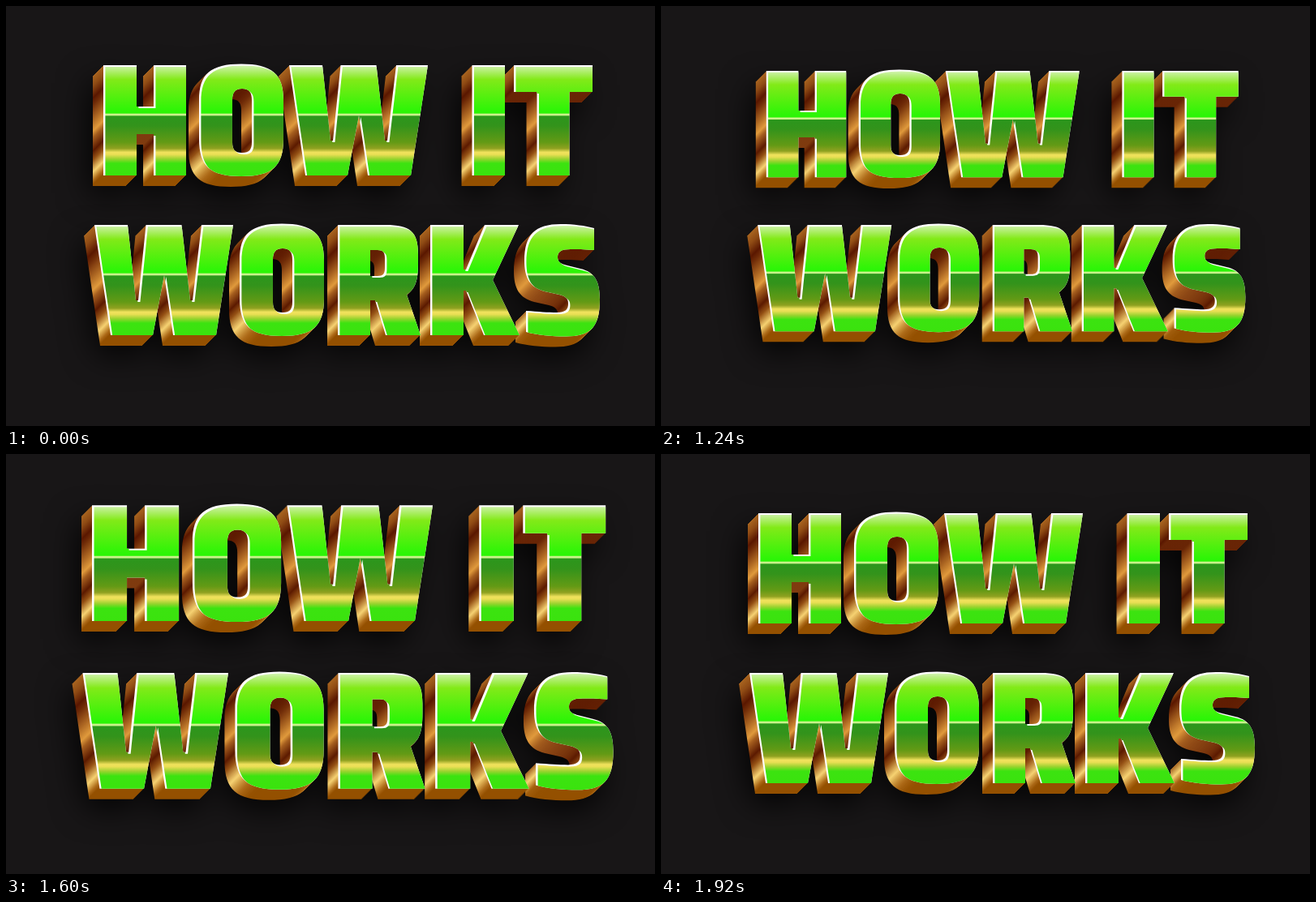
Write an HTML page with a canvas that moves like this. It is 800x518 px and loops after 1960 ms.

```html
<!DOCTYPE html>
<html lang="en">
<head>
<meta charset="utf-8">
<title>How it works</title>
<style>
  html, body { margin: 0; width: 100%; height: 100%; overflow: hidden; background: #181617; }
  canvas { display: block; }
</style>
</head>
<body>
<canvas id="stage" width="800" height="518" role="img" aria-label="HOW IT WORKS"></canvas>
<script>
const ctx = document.getElementById('stage').getContext('2d');
const DEPTH = 13, LINE_GAP = 197, HEIGHT = 136, EDGE_X = 2.4, EDGE_Y = 2;

// Letter outlines, at their places for scale 1
const H = 'M120 73H161V124H182V73H222V209H182V158H161V209H120Z';
const O = 'M290 71.5C328 71.5 342 84 342 116V164C342 198 328 210 290 210C252 210 238 198 238 164V116C238 84 252 71.5 290 71.5Z' +
  'M291 102C282 102 279 107 279 116V168C279 177 282 181 291 181C300 181 303 177 303 168V116C303 107 300 102 291 102Z';
const W = 'M349 73H390L400 166H403L412.5 73H456.5L467 166H470L481 73H520L499 209H446L435 135L421 209H369Z';
const I = 'M574.5 73H615V209H574.5Z';
const T = 'M626 73H723V106H694.5V209H654.5V106H626Z';
const R = 'M409 270H468C498 270 508 278 508 306V318C508 340 504 349 494 356L511 406H468L455 363H449V406H409Z' +
  'M449 301H458C465 301 467 304 467 311V323C467 330 465 333 458 333H449Z';
const K = 'M523 270H564V325H567L590 270H632L600 338L633 406H589L567 351H564V406H523Z';
const S = 'M725 274V301C712 300 704 300 696 300C684 300 680 303 680 310C680 316 684 318 692 320L708 324' +
  'C726 328 732 340 732 362C732 397 720 407.5 690 407.5C672 407.5 656 406 641 402V376C656 377 668 378 679 378' +
  'C690 378 693 374 693 367C693 360 689 358 682 356L664 352C646 347 639 336 639 314C639 282 652 269 684 269' +
  'C700 269 714 271 725 274Z';

const FACE = [[0, '#d8f4bc'], [.03, '#c0f08e'], [.13, '#82ea18'], [.42, '#2bf506'], [.435, '#2bf506'],
  [.442, '#c9f28a'], [.455, '#c9f28a'], [.462, '#2b961c'], [.55, '#33931b'], [.7, '#639a15'],
  [.755, '#8fa120'], [.79, '#f0e25c'], [.81, '#eadf55'], [.85, '#9ad32f'], [.89, '#3ce310'], [1, '#3ae30e']];
const SIDE = [[0, '#a8641f'], [.09, '#8f4b14'], [.2, '#5a1700'], [.26, '#702c08'], [.4, '#b06a24'],
  [.5, '#e09a3c'], [.56, '#a45d1e'], [.68, '#5c1a00'], [.76, '#945014'], [.87, '#f6d272'],
  [.95, '#ad6a18'], [.985, '#945000'], [1, '#945000']];

function gradient(top, stops) {
  const g = ctx.createLinearGradient(0, top, 0, top + HEIGHT);
  stops.forEach(([at, color]) => g.addColorStop(at, color));
  return g;
}

function makeLine(top, parts) {
  const path = new Path2D();
  for (const [d, dx = 0, dy = 0] of parts)
    path.addPath(new Path2D(d), new DOMMatrix([1, 0, 0, 1, dx, dy]));
  return { path, face: gradient(top - EDGE_Y, FACE), side: gradient(top, SIDE) };
}

const lines = [
  makeLine(73, [[H], [O], [W], [I], [T]]),
  makeLine(73 + LINE_GAP, [[W, -240, LINE_GAP], [O, 50, LINE_GAP], [R], [K], [S]])
];

// Turning points of the pulse: [step, scale]
const PULSE = [[0, 1], [1.5, 1.053], [6, .933], [9, 1.061], [13, .935], [16, 1.05], [21, .985], [24, 1]];

function scaleAt(step) {
  const n = Math.max(1, PULSE.findIndex(([at]) => at >= step));
  const [a, from] = PULSE[n - 1], [b, to] = PULSE[n];
  return from + (to - from) * (1 - Math.cos(Math.PI * (step - a) / (b - a))) / 2;
}

// Runs paint with the text scaled about its centre and shifted by whole pixels
function place(scale, dx, dy, paint) {
  ctx.save();
  ctx.translate(400 + dx, 270 + dy);
  ctx.scale(scale, scale);
  ctx.translate(-400, -270);
  paint();
  ctx.restore();
}

function fill(line, style) {
  ctx.fillStyle = style;
  ctx.fill(line.path, 'evenodd');
}

function draw(scale) {
  ctx.fillStyle = '#181617';
  ctx.fillRect(0, 0, 800, 518);

  place(scale, -DEPTH, DEPTH, () => {
    ctx.shadowColor = '#000';
    ctx.shadowBlur = 40;
    ctx.shadowOffsetX = -2;
    ctx.shadowOffsetY = 9;
    lines.forEach(line => fill(line, '#000'));
  });

  for (let k = DEPTH; k > 0; k--)
    place(scale, -k, k, () => lines.forEach(line => fill(line, line.side)));

  // White top-left edge: the green is shifted inside the letter
  for (const line of lines) place(scale, 0, 0, () => {
    fill(line, '#fff');
    ctx.clip(line.path, 'evenodd');
    ctx.translate(EDGE_X, EDGE_Y);
    fill(line, line.face);
  });
}

function tick() {
  const t = performance.now() % 1960;
  draw(scaleAt(t < 1000 ? 0 : Math.floor((t - 1000) / 40) + 1));
  requestAnimationFrame(tick);
}
tick();
</script>
</body>
</html>
```
